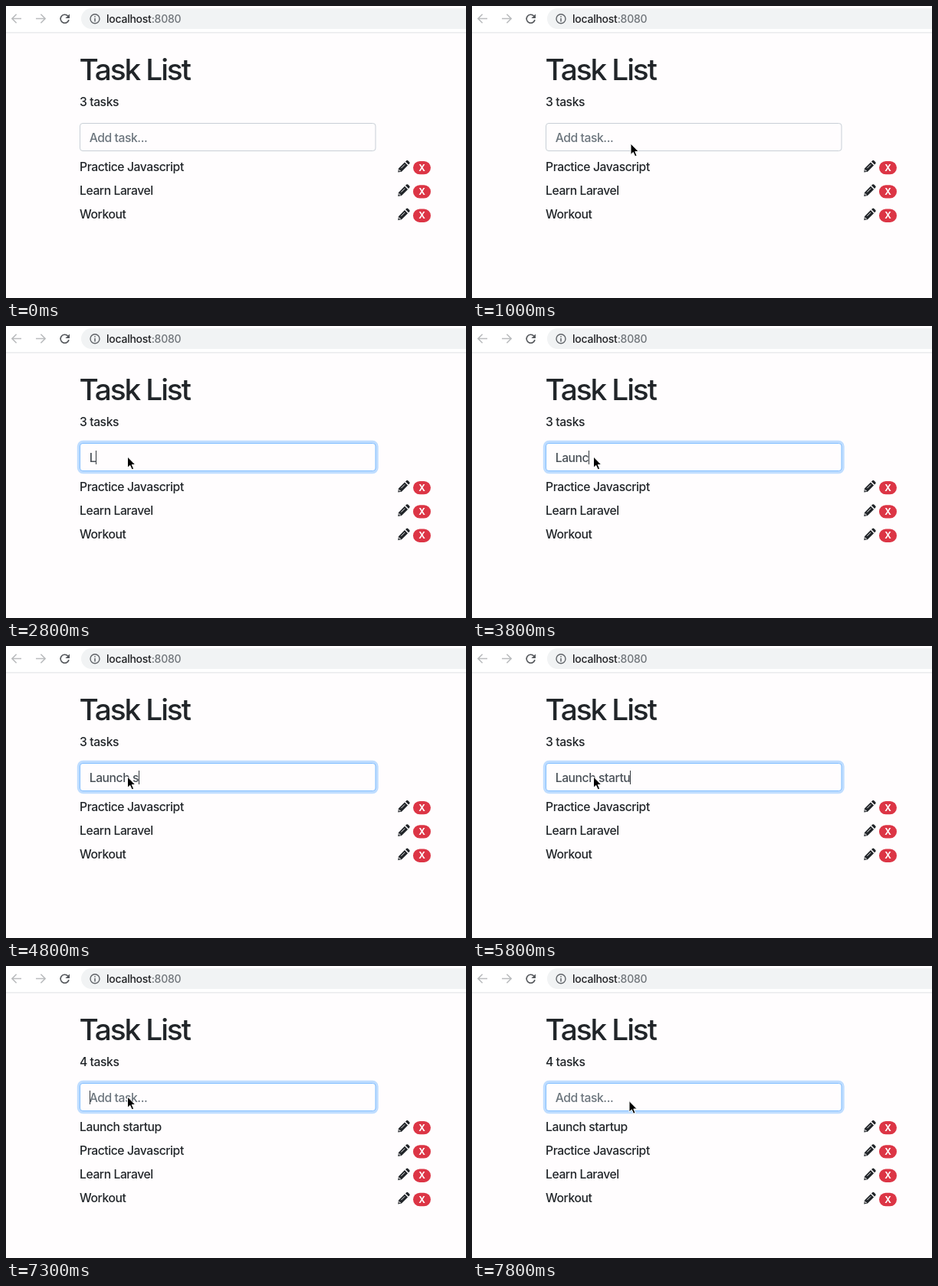
Animation, 600 px wide and 382 px high, one loop 8000 ms. Source, as an HTML page:

```html
<!DOCTYPE html>
<html lang="en">
<head>
<meta charset="utf-8">
<title>Task List</title>
<style>
  html, body { margin: 0; width: 100%; height: 100%; overflow: hidden; background: #fffdfe; }
  svg { display: block; width: 600px; height: 382px; }
  text { font: 450 15.7px Inter, Roboto, sans-serif; letter-spacing: -0.43px; fill: #212529; white-space: pre; }
  .title { font-size: 38.8px; font-weight: 540; letter-spacing: -2.1px; }
  .url { font-size: 14px; letter-spacing: -0.25px; fill: #202124; }
  .port { fill: #70757a; }
  .hint { fill: #6c757d; }
  .typed { fill: #495057; }
  .x { font-size: 11.7px; font-weight: 700; letter-spacing: 0; fill: #fff; text-anchor: middle; }
  .line { fill: none; stroke-width: 1.6; }
</style>
</head>
<body>
<svg viewBox="0 0 600 382">
  <defs>
    <g id="pencil">
      <path fill="#212529" d="M9 2.9 13.1 7 5 15.1.3 16 1 11ZM10 1.9 11.3.7q1-.9 2 0l2 2q.9 1 0 2L14.1 6Z"/>
      <path fill="none" stroke="#fffdfe" stroke-width=".9" d="M4.4 10.6 9.2 5.8M1.9 12.2V14.1H3.8"/>
    </g>
  </defs>

  <rect width="600" height="35" fill="#fff"/>
  <path d="M0 34.9H600" stroke="#dfe0e3"/>
  <rect x="98" y="3" width="530" height="27" rx="13.5" fill="#f1f3f4"/>
  <g class="line" stroke="#babcbe">
    <path d="M20 16.5H8M13.6 10.8 7.9 16.5 13.6 22.2"/>
    <path d="M39 16.5H51M45.4 10.8 51.1 16.5 45.4 22.2"/>
  </g>
  <path class="line" stroke="#55585c" d="M80.7 13A5.5 5.5 0 1 0 82 18"/>
  <path fill="#55585c" d="M83 10.4V16H77.4Z"/>
  <circle class="line" cx="116" cy="16.8" r="6" stroke="#5f6368" style="stroke-width:1.4"/>
  <path d="M116 13.2V14.8M116 16V20.4" stroke="#5f6368" stroke-width="1.5"/>
  <text class="url" x="131" y="21.5">localhost<tspan class="port">:8080</tspan></text>

  <text class="title" x="95.4" y="97">Task List</text>
  <text id="count" x="96" y="131.3"></text>
  <rect id="glow" x="96.5" y="153.5" width="385.5" height="36" rx="4" fill="none"/>
  <rect id="box" x="96.5" y="153.5" width="385.5" height="36" rx="3.5" fill="#fffdfe"/>
  <text id="field" x="108.7" y="177.5"></text>
  <path id="caret" stroke="#33383d" d="M.5 163V181"/>
  <g id="rows"></g>
  <path id="mouse" d="M0 0V14.4L3.3 11.4 5.7 16.8 8.1 15.7 5.8 10.5H10.3Z" fill="#000" stroke="#fff"/>
</svg>
<script>
const LOOP = 8000, ENTER = 300, CLICK = 1800, TYPE = 2800, DONE = 6000, SEND = 7300, LEAVE = 7800;
const PHRASE = "Launch startup";
const TASKS = ["Practice Javascript", "Learn Laravel", "Workout"];
const $ = id => document.getElementById(id);
const clamp = v => Math.min(1, Math.max(0, v));
const lerp = (a, b, k) => a + (b - a) * k;

// The screen refreshes twice every half second, after 0 and 300 ms.
const refresh = t => t - t % 500 + (t % 500 >= 300 ? 300 : 0);

const typeWord = (word, t, start, pace) =>
  word.slice(0, Math.max(0, Math.floor((t - start) / pace)));

function typedText(t) {
  if (t >= SEND) return "";
  return typeWord("Launch ", t, 2516, 245) + typeWord("startup", t, 4500, 200);
}

function caretOn(t) {
  const typing = t >= TYPE && t <= DONE;
  return t > CLICK && (typing || t % 1000 < 500);
}

function mousePos(t) {
  if (t >= LEAVE) return [205, 176.5];
  if (t >= CLICK) return [158.5, 171];
  const k = clamp((t - ENTER) / 700);
  return [lerp(518, 207, 1 - (1 - k) ** 1.45), lerp(91, 180, k ** 1.6)];
}

function drawRows(list) {
  $("count").textContent = list.length + " tasks";
  $("rows").innerHTML = list.map((name, i) => `
    <g transform="translate(0 ${i * 31.3})">
      <text x="96" y="215.6">${name}</text>
      <use href="#pencil" x="511" y="201.6"/>
      <rect x="531" y="202.9" width="23" height="17.4" rx="8.7" fill="#dc3545"/>
      <text class="x" x="542.5" y="215.8">X</text>
    </g>`).join("");
}

function drawField(t) {
  const focus = clamp((t - CLICK) / 500);
  const edge = [lerp(200, 128, focus), lerp(207, 189, focus), lerp(214, 255, focus)];
  $("box").setAttribute("stroke", `rgb(${edge.map(Math.round)})`);
  $("glow").setAttribute("stroke", `rgba(0,123,255,${0.25 * focus})`);
  $("glow").setAttribute("stroke-width", 1 + 6.4 * focus);

  const field = $("field"), typed = typedText(t);
  field.textContent = typed || "Add task...";
  field.setAttribute("class", typed ? "typed" : "hint");
  const x = Math.round(108.7 + (typed && field.getComputedTextLength()));
  $("caret").setAttribute("transform", `translate(${x})`);
  $("caret").style.display = caretOn(t) ? "" : "none";
}

let last = -1;
function draw(t) {
  if (t === last) return;
  last = t;
  drawRows(t < SEND ? TASKS : [PHRASE, ...TASKS]);
  drawField(t);
  $("mouse").style.display = t < ENTER ? "none" : "";
  $("mouse").setAttribute("transform", `translate(${mousePos(t)})`);
}

const start = performance.now();
function tick() {
  draw(refresh(Math.floor(performance.now() - start) % LOOP));
  requestAnimationFrame(tick);
}
tick();
</script>
</body>
</html>
```
